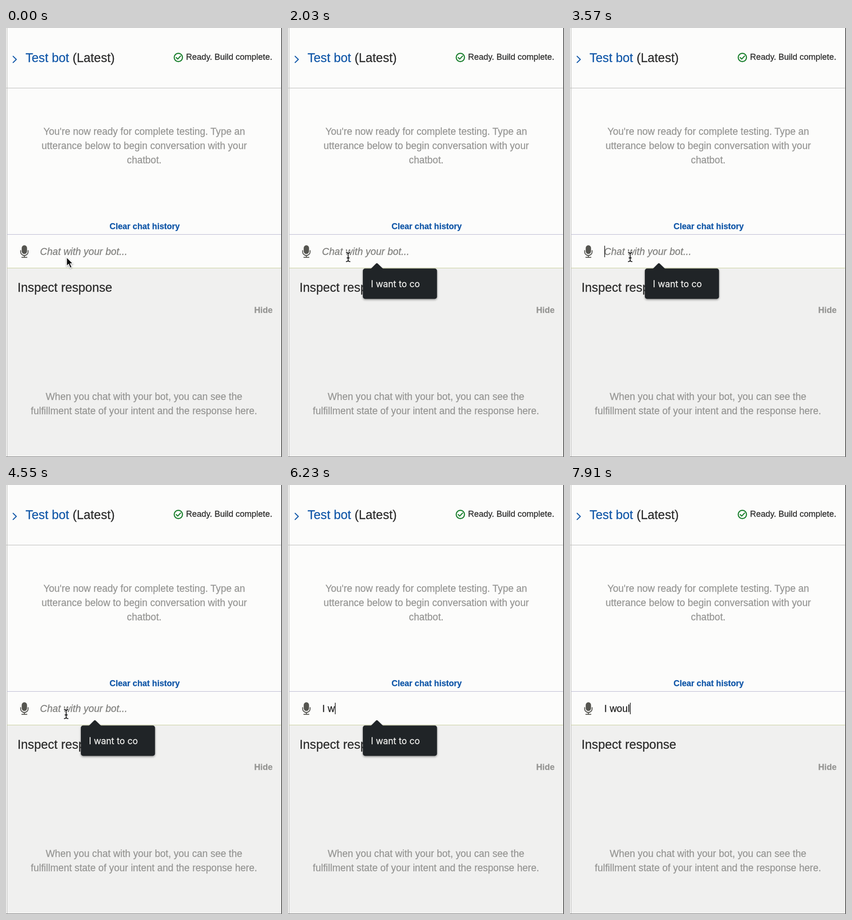
Animation, 601 px wide and 932 px high, one loop 8 s. Source, as an HTML page:

```html
<!DOCTYPE html>
<html lang="en">
<head>
<meta charset="utf-8">
<title>Test bot</title>
<style>
  html, body { margin: 0; width: 100%; height: 100%; overflow: hidden; background: #fcfcfb; }
  svg { display: block; width: 601px; height: 932px; font-family: "Liberation Sans", Arial, sans-serif; }
  text { fill: currentColor; stroke: currentColor; stroke-width: .3px; }
  .body { font-size: 21.17px; color: #969694; text-anchor: middle; }
  .heading { font-size: 27.1px; color: #2b2b2b; }
  .blue { color: #1157a8; fill: #1157a8; stroke: #1157a8; }
  .entry { font-size: 21.4px; color: #222; }
  .line { fill: none; stroke-linecap: round; stroke-linejoin: round; }
</style>
</head>
<body>
<svg viewBox="0 0 601 932">
  <defs>
    <path id="beamShape" d="M127 488q4 0 4 3.5 0-3.500 4-3.500M131 491v13M127 507.500q4 0 4-3.500 0 3.500 4 3.500M128.500 499.500h5"/>
  </defs>
  <rect width="601" height="932" fill="#fcfcfb"/>
  <rect y="522" width="601" height="410" fill="#f0f0ef"/>
  <rect width="2" height="932" fill="#f4f4f3"/>
  <rect x="2" width="1" height="932" fill="#bcbcba"/>
  <rect y="130" width="599" height="1" fill="#b8b8b6"/>
  <rect x="2" y="448" width="597" height="1" fill="#b8b7d0"/>
  <rect x="2" y="521" width="597" height="1" fill="#c6ce98"/>
  <rect x="599" width="1" height="932" fill="#b0b0b0"/>
  <rect x="600" width="1" height="932" fill="#1c1c1c"/>
  <rect y="931" width="601" height="1" fill="#777"/>

  <path class="line" d="M15.5 61.5 22.5 68.2 15.5 75" stroke="#1157a8" stroke-width="2.2"/>
  <text class="heading" x="42.5" y="74"><tspan class="blue">Test bot</tspan> (Latest)</text>
  <circle cx="375.3" cy="64" r="9" fill="none" stroke="#1d8130" stroke-width="2.4"/>
  <path class="line" d="M370.7 64.3 374 67.5 380 61" stroke="#1d8130" stroke-width="2.4"/>
  <text x="392" y="69" font-size="18.4" color="#2b2b2b">Ready. Build complete.</text>

  <g class="body">
    <text x="301" y="232">You're now ready for complete testing. Type an</text>
    <text x="301" y="263">utterance below to begin conversation with your</text>
    <text x="301" y="294">chatbot.</text>
    <text x="300.5" y="808">When you chat with your bot, you can see the</text>
    <text x="300.5" y="839">fulfillment state of your intent and the response here.</text>
  </g>
  <text class="blue" x="302" y="437" font-size="18.1" font-weight="bold" text-anchor="middle">Clear chat history</text>

  <rect x="34.2" y="472" width="11.6" height="19" rx="5.8" fill="#555550"/>
  <path class="line" d="M31.8 483.5v2.5a8.2 8.2 0 0 0 16.4 0v-2.5M40 494.5v3.5M34.5 498.3h11" stroke="#555550" stroke-width="1.9"/>

  <text id="placeholder" class="entry" x="74" y="493" font-style="italic" style="color:#80807e">Chat with your bot...</text>
  <text id="typed" class="entry" x="74.5" y="493" xml:space="preserve"></text>
  <rect id="caret" y="473" width="1.4" height="25" fill="#111"/>

  <text class="heading" x="25" y="573">Inspect response</text>
  <text x="580.5" y="619" font-size="18.5" font-weight="bold" color="#969694" text-anchor="end">Hide</text>

  <g id="tooltip">
    <g style="filter:drop-shadow(0 2px 2px rgba(0,0,0,.4))" fill="#202427">
      <rect x="163" y="522.5" width="161.5" height="66" rx="5"/>
      <path d="M180 523.5 191.5 512q2-2 4 0L207.5 523.5z"/>
    </g>
    <text x="180.5" y="563" font-size="19.4" font-family="Inter, sans-serif" color="#f0f0ee">I want to co</text>
  </g>

  <path id="arrow" d="M132 498v19.5l4.3-4.2 3.6 8.2 3.5-1.5-3.5-8h6z" fill="#0b0b0b" stroke="#fff" stroke-width="1.4"
        style="filter:drop-shadow(0 1px 1.5px rgba(0,0,0,.4))"/>
  <g id="beam" class="line">
    <use href="#beamShape" stroke="#fff" stroke-width="4"/>
    <use href="#beamShape" stroke="#111" stroke-width="1.8"/>
  </g>
</svg>
<script>
const LOOP = 8000, HOVER = 200, FOCUS = 720, BLINK = 1080;
const MESSAGE = "I woul";
const KEY_TIMES = [5300, 5560, 6000, 6600, 7120, 7650];
const MISMATCH = KEY_TIMES[3];

const part = id => document.getElementById(id);
const show = (id, visible) => part(id).style.display = visible ? "" : "none";

function draw(t) {
  const count = KEY_TIMES.filter(key => key <= t).length;
  const typing = count > 0;
  const typed = part("typed");
  typed.textContent = MESSAGE.slice(0, count);

  show("arrow", t < HOVER);
  show("beam", t >= HOVER && !typing);
  show("placeholder", !typing);
  show("tooltip", t >= FOCUS && t < MISMATCH);
  show("caret", typing || (t >= FOCUS && Math.floor((t - FOCUS) / BLINK) % 2 === 0));
  part("caret").setAttribute("x", 74.8 + (typing ? typed.getComputedTextLength() : 0));
}

const start = performance.now();
function frame() {
  draw((performance.now() - start) % LOOP);
  requestAnimationFrame(frame);
}
frame();
</script>
</body>
</html>
```
